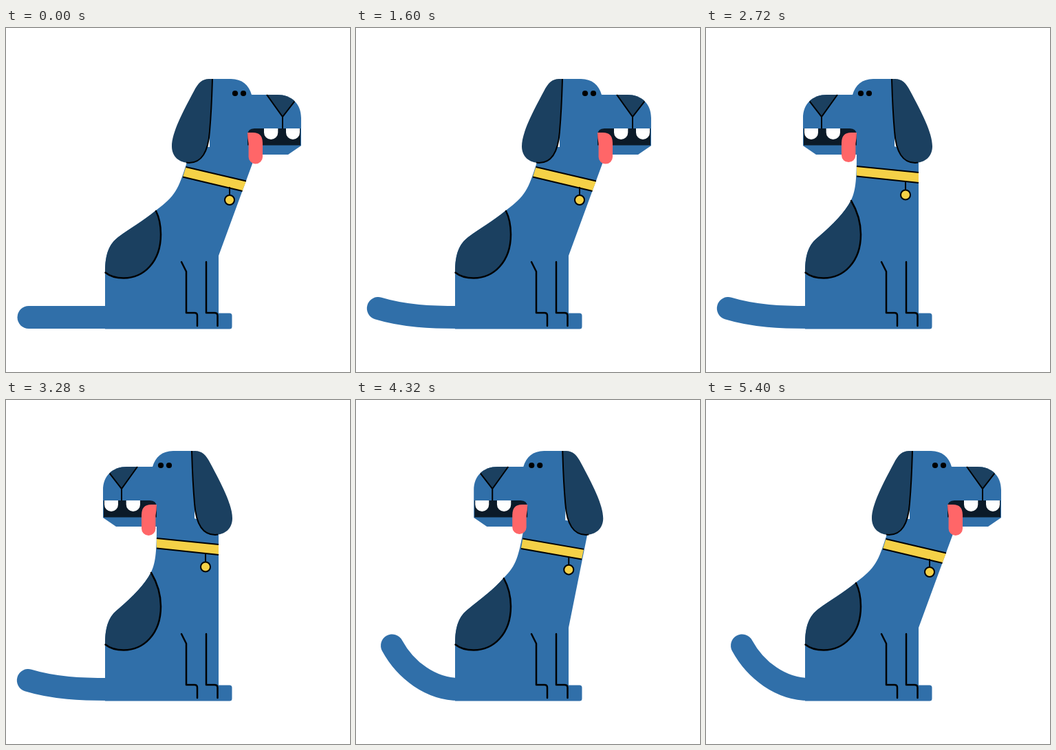
Write an HTML page that moves like this. It is 500 px wide and 500 px high and loops after 5440 ms.

```html
<!DOCTYPE html>
<html lang="en">
<head>
<meta charset="utf-8">
<title>Sitting dog</title>
<style>
  html, body { margin: 0; width: 100%; height: 100%; overflow: hidden; background: #fff; }
  svg { display: block; width: 100vw; height: 100vh; }
  .blue { fill: #306fa9; }
  .dark { fill: #1b4060; }
  .gold { fill: #f5d147; }
  .line { fill: none; stroke: #000; stroke-width: 2; }
  .bold { stroke-width: 2.5; stroke-linecap: round; stroke-linejoin: round; }
  #tail { fill: none; stroke: #306fa9; stroke-width: 33; stroke-linecap: round; }
</style>
</head>
<body>
<svg viewBox="0 0 500 500">
  <path id="tail"/>
  <path id="body" class="blue"/>
  <path id="spot" class="dark"/>
  <path id="spotEdge" class="line bold"/>
  <path class="line bold" d="M255 340L262 354V414H274Q278 414 278 418V433M291 340V414H303Q307.5 414 307.5 418V433"/>
  <path id="collar" class="gold"/>
  <path id="collarEdge" class="line"/>
  <g id="tag">
    <path class="line" d="M0 -19V-7"/>
    <circle class="gold" r="7" stroke="#000" stroke-width="2"/>
  </g>
  <g id="head">
    <path class="blue" d="M160 184L141 171V131C141 110 155 97 176 97H213C217 83 227 74 243 74H274V184Z"/>
    <path class="dark" d="M270 74H275C285 74 291 80 297 92C313 122 329 152 329 172C329 187 318 196 304 196C286 196 276 180 274 150C271 115 270.5 90 270 74Z"/>
    <path class="line" d="M270 74C270.5 90 271 115 274 150C276 180 286 196 304 196L308 195.6"/>
    <path class="dark" d="M150.6 106.1C156.7 100.3 165.5 97 176 97H191L168 129Z"/>
    <path class="line" d="M150.6 106.6L168 129L191 97M168 129V147"/>
    <path fill="#0b1a28" d="M142 146H209Q219 146 219 156V170.5H142Z"/>
    <path fill="#fff" d="M143 146H163V152a10 10 0 0 1 -20 0ZM174.7 146H195V152a10.1 10 0 0 1 -20.3 0Z"/>
    <path id="tongue" fill="#ff6668"/>
    <g id="eyes"><circle cx="225" r="4.1"/><circle cx="237" r="4.1"/></g>
  </g>
</svg>
<script>
const FRAME = 40, COUNT = 136;
const el = id => document.getElementById(id);
const draw = (id, d) => el(id).setAttribute('d', d);
const place = (id, t) => el(id).setAttribute('transform', t);

// Seven tail poses: two control points and the tip
const tails = [
  '111 420.5 72 420.5 33 420.5',
  '110 420.5 70 406 40.5 380',
  '113 420.5 77 387 76 338',
  '117 420.5 86 379 107 322',
  '116 420.5 84 382 100.5 325',
  '109 420.5 72 393 52.5 357',
  '110 420.5 70 419 32.3 407.5'
];

// Head turns, held for two frames per pose; 1 leans right, 0 is upright
const turn = { 44: .9, 46: .45, 106: .15, 108: .55, 110: .9 };
const blink = { 41: .5, 42: .15, 43: .5 };

function render(n) {
  const even = n - n % 2;
  const p = turn[even] ?? (even < 44 || even > 110 ? 1 : 0);
  const mix = (a, b) => +(a + (b - a) * p).toFixed(2);
  const pt = (x0, y0, x1, y1) => mix(x0, x1) + ' ' + mix(y0, y1) + ' ';

  const leftScene = n >= 46 && n <= 106;
  const pose = Math.floor((leftScene ? n : n + 1) % 14 / 2);
  draw('tail', 'M150 420.5C' + tails[pose]);

  const back = 'C144 328 150 314 163 304C' + pt(184, 286, 180, 291) + pt(202, 268, 199, 281) + pt(211, 250, 218, 265);
  const nape = 'C' + pt(218, 236, 246, 244) + pt(219, 216, 250, 236) + pt(219, 184, 263, 195);
  draw('body', 'M144 437.5V355' + back + nape + 'L' + pt(219, 160, 270, 170) + 'L' + pt(309, 180, 364, 181) +
    'L309 331V414.5H325Q328.5 414.5 328.5 418V434Q328.5 437.5 325 437.5Z');

  const rim = 'C' + pt(221, 268, 223, 276) + '225 285 225 300C225 340 200 363.5 171 363.5C160 363.5 150 360 144.5 355.5';
  draw('spot', 'M144 355' + back + rim + 'Z');
  draw('spotEdge', 'M' + pt(211, 251, 218, 266) + rim);

  const topL = pt(219, 201, 261.5, 202), topR = pt(309, 210, 349, 222.5);
  const lowL = pt(219, 215.5, 257, 216.5), lowR = pt(309, 225, 343.5, 237);
  draw('collar', `M${topL}L${topR}L${lowR}L${lowL}Z`);
  draw('collarEdge', `M${topL}L${topR}M${lowL}L${lowR}`);
  place('tag', `translate(${pt(290, 242.5, 325, 250)})`);

  const facesRight = n < 46 || n >= 110;
  place('head', facesRight ? `translate(${570 - 55 * (1 - p)} 0) scale(-1 1)` : `translate(${55 * p} 0)`);
  place('eyes', `translate(0 95) scale(1 ${blink[n] ?? 1})`);

  const tip = 196.3 + 1.3 * Math.cos((even - 1) * 14 * Math.PI / COUNT);
  draw('tongue', `M219 152H211Q197 152 197 167V${tip - 10}a10.2 10 0 0 0 20.4 0V168Q219 160 219 152Z`);
}

const start = performance.now();
function tick() {
  render(Math.floor((performance.now() - start) / FRAME) % COUNT);
  requestAnimationFrame(tick);
}
tick();
</script>
</body>
</html>
```
